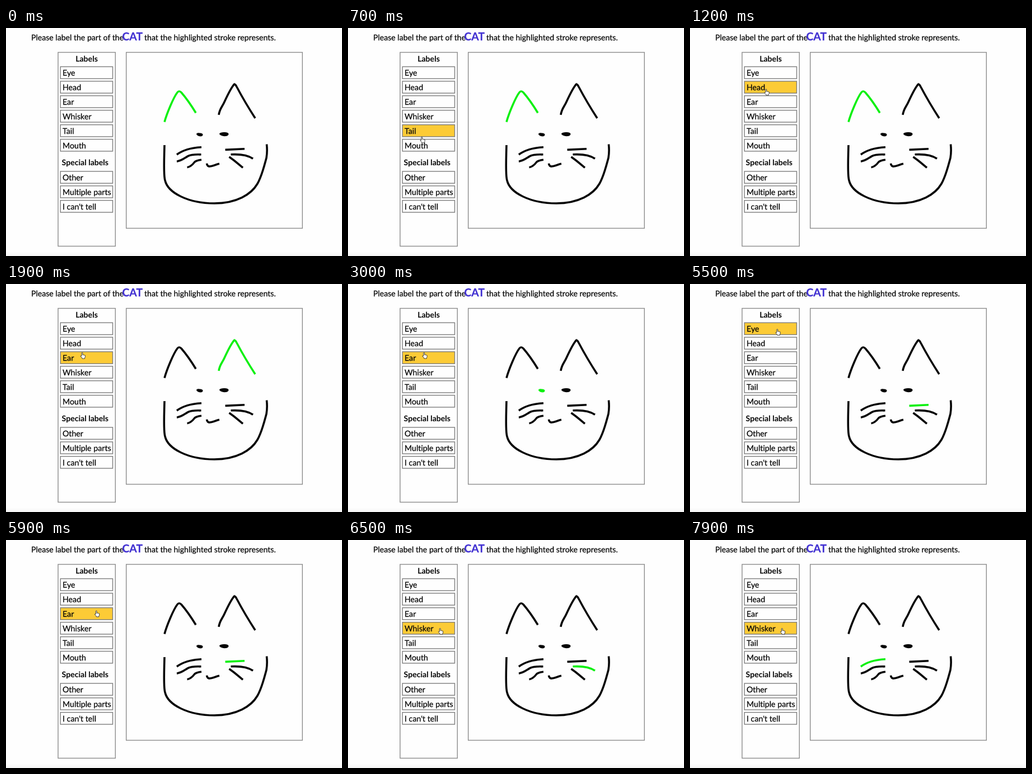
These frames come from a looping animation (600 by 407 pixels, 8000 ms). An HTML page:

```html
<!DOCTYPE html>
<html lang="en">
<head>
<meta charset="utf-8">
<title>Stroke labelling</title>
<style>
  html, body { margin: 0; width: 100%; height: 100%; overflow: hidden; background: #fefefe; }
  svg { display: block; width: 100%; height: 100%; }
  text {
    font: 14.1px Lato, sans-serif; fill: #050505; stroke: #050505; stroke-width: .25;
    font-variant-ligatures: none; text-rendering: geometricPrecision;
  }
  .bold { font-weight: 700; stroke: none; }
  .word { font-size: 19.4px; font-weight: 700; fill: #4232d2; stroke: #4232d2; }
  .frame { fill: #fefefe; stroke: #8c8c8c; stroke-width: 1.4; }
  .row rect { fill: #fefefe; stroke: #7e7e7e; stroke-width: 1.4; }
  .row text { font-size: 14.2px; }
  .row.hover rect { fill: #fccb36; }
  #sketch path { fill: none; stroke: #050505; stroke-width: 3.6; stroke-linejoin: round; }
  #sketch path.eye { fill: #050505; stroke-width: 1.2; }
  #sketch path.active { stroke: #0bf00f; }
  #sketch path.eye.active { fill: #0bf00f; }
</style>
</head>
<body>
<svg viewBox="0 0 600 407">
  <defs>
    <linearGradient id="fade" x2="0" y2="1">
      <stop stop-color="#fefefe"/><stop offset="1" stop-color="#f5f5f5"/>
    </linearGradient>
  </defs>
  <rect y="399" width="600" height="8" fill="url(#fade)"/>
  <text x="45" y="22">Please label the part of the</text>
  <text x="207.5" y="22" class="word">CAT</text>
  <text x="247" y="22">that the highlighted stroke represents.</text>
  <rect class="frame" x="93" y="43.5" width="102.3" height="346"/>
  <rect class="frame" x="214.7" y="43.5" width="314.6" height="314"/>
  <text x="144" y="60" class="bold" text-anchor="middle">Labels</text>
  <text x="141.3" y="245" class="bold" text-anchor="middle">Special labels</text>
  <g id="rows"></g>
  <g id="sketch"></g>
  <g id="cursor" fill="#fff" stroke="#222" stroke-width=".9" stroke-linejoin="round">
    <path id="hand" transform="scale(1 .92)" d="M-.6 6.8V1.4a.95 .95 0 0 1 1.9 0V5q.9-.6 1.6.1.9-.4 1.5.3 1.3-.2 1.3.9V8.4q0 1.2-.8 2.2V12H.4q0-1.2-1.2-2.4L-2.5 7.6q-.3-1.1.8-.9Z"/>
    <path id="arrow" fill="#111" stroke="#fff" d="M0 0V10.5L2.4 8.3 4 12 5.7 11.3 4.1 7.7H7.4Z"/>
  </g>
</svg>
<script>
const LOOP = 8000, STEP = 100, ROW_GAP = 25.9, ROW_HEIGHT = 21.3;
const $ = id => document.getElementById(id);

function add(parent, tag, attrs, text = '') {
  const el = document.createElementNS('http://www.w3.org/2000/svg', tag);
  for (const key in attrs) el.setAttribute(key, attrs[key]);
  el.textContent = text;
  return parent.appendChild(el);
}

function addRows(top, names) {
  return names.map((name, i) => {
    const y = top + ROW_GAP * i;
    const el = add($('rows'), 'g', { class: 'row' });
    add(el, 'rect', { x: 97.2, y, width: 93.3, height: ROW_HEIGHT });
    add(el, 'text', { x: 101, y: y + 16 }, name);
    return { el, y };
  });
}

const rows = [
  ...addRows(69.1, ['Eye', 'Head', 'Ear', 'Whisker', 'Tail', 'Mouth']),
  ...addRows(255.9, ['Other', 'Multiple parts', "I can't tell"])
];

const shapes = {
  earL: 'M283 167.8C287 153 299 124 306 115Q309 111 313 115C320 123 332 140 339 151.5',
  earR: 'M380 155C381.5 144 386 141 390 132C396 119 402 106 408 100Q410 101 412 105C421 122 434 144 445 161',
  eyeL: 'M340.5 189.3Q341 187.5 344 187.8Q350 187.8 351 190Q351 193 347 193Q342 192.5 340.5 189.3Z',
  eyeR: 'M381.5 189Q383 186.6 390 186.7Q397 187 397 189.5Q396 192.6 390 192.6Q384 192.5 381.5 189Z',
  whiskerR1: 'M391.5 217.4L426 215.8',
  whiskerR2: 'M401.5 225.8C416 225 432 227 441 233.3',
  whiskerR3: 'M398.5 230Q404 234 408 237L423 249.3',
  whiskerL1: 'M305 226C316 217.5 332 213.7 349 212.7',
  whiskerL2: 'M305 238.2C314 237 319 232 325 228.7C332 225 341 226 348.5 225.8',
  whiskerL3: 'M323.5 248.7C330 248 334 243 337 239Q341 236 349 235.3',
  mouth: 'M358.5 241.8C359 245.3 361 247.5 364 247C370 246.5 375 243.5 381 242.3',
  head: 'M283 209C282.5 235 281 262 284 272C289 294 325 313 372 313C412 313 438 297 449 278C457 264 462 243 465 232C466.5 223 466.5 216 465.5 207.5'
};
const strokes = {};
for (const name in shapes) {
  strokes[name] = add($('sketch'), 'path', { d: shapes[name], class: name.startsWith('eye') ? 'eye' : '' });
}

// [time, stroke to be labelled]
const prompts = [
  [0, 'earL'], [1900, 'earR'], [2500, 'eyeL'], [4100, 'eyeR'], [4700, 'whiskerR1'],
  [6500, 'whiskerR2'], [7100, 'whiskerR3'], [7800, 'whiskerL1']
];

// [time, x, y] of the pointer tip
const moves = [
  [200, 214, 278], [300, 129, 235.5], [600, 130, 226], [800, 133, 162], [1000, 135, 110],
  [1100, 135.5, 107], [1200, 135.5, 108.8], [1400, 134.5, 121], [1700, 135.5, 122],
  [2700, 136.5, 122.5], [3000, 135.5, 122], [3300, 135.5, 122], [3500, 144, 100],
  [3700, 154.5, 82], [3800, 155.5, 80.3], [5500, 155.5, 80.3], [5700, 158, 97],
  [5900, 161, 126], [6100, 163.5, 152], [6200, 164, 157.3], [LOOP, 164, 157.3]
];

function pointerAt(t) {
  const i = moves.findIndex(m => m[0] > t);
  if (i < 1) return null;
  const [t0, x0, y0] = moves[i - 1], [t1, x1, y1] = moves[i];
  const k = (t - t0) / (t1 - t0);
  return { x: x0 + (x1 - x0) * k, y: y0 + (y1 - y0) * k };
}

function draw(t) {
  const active = prompts.filter(p => p[0] <= t).pop()[1];
  for (const name in strokes) strokes[name].classList.toggle('active', name === active);

  const p = pointerAt(t);
  const hovered = p && p.x < 191 && rows.find(r => p.y >= r.y && p.y <= r.y + ROW_HEIGHT);
  for (const r of rows) r.el.classList.toggle('hover', r === hovered);

  $('cursor').style.display = p ? '' : 'none';
  if (!p) return;
  $('cursor').setAttribute('transform', `translate(${p.x} ${p.y})`);
  $('hand').style.display = hovered ? '' : 'none';
  $('arrow').style.display = hovered ? 'none' : '';
}

const start = performance.now();
function tick() {
  const t = (performance.now() - start) % LOOP;
  draw(Math.floor(t / STEP) * STEP);
  requestAnimationFrame(tick);
}
tick();
</script>
</body>
</html>
```
